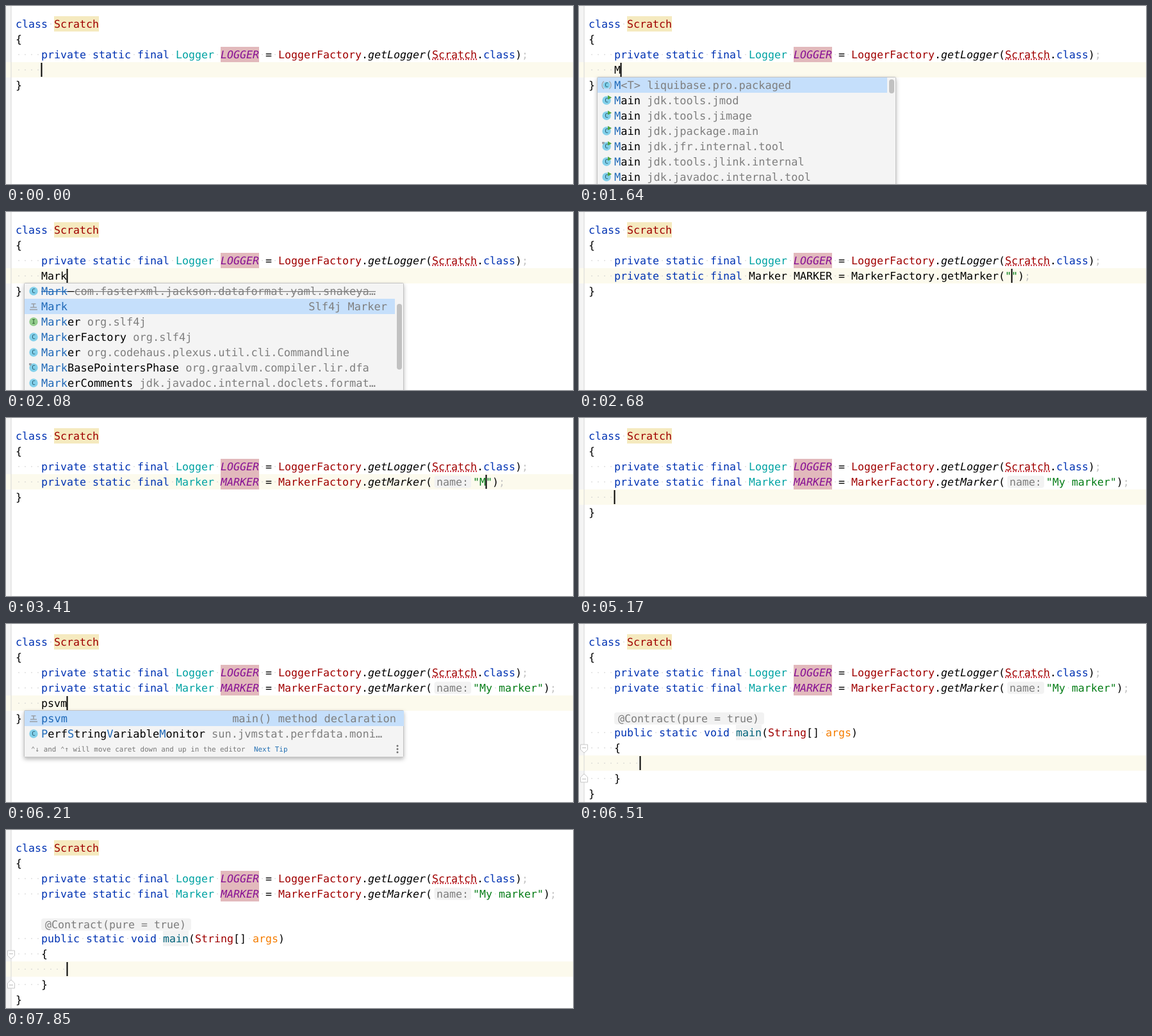
An HTML page for the animation above (8000 ms loop, 885 px wide and 279 px high).

```html
<!DOCTYPE html>
<html lang="en">
<head>
<meta charset="utf-8">
<title>Logger and marker templates</title>
<style>
html, body { margin: 0; width: 100%; height: 100%; overflow: hidden; background: #fff; }
svg { display: block; }
text {
  font-family: "DejaVu Sans Mono", monospace;
  white-space: pre;
  text-rendering: geometricPrecision;
}
</style>
</head>
<body>
<svg id="stage" width="885" height="279" viewBox="0 0 885 279" xmlns="http://www.w3.org/2000/svg">
  <defs>
    <filter id="shadow" x="-10%" y="-20%" width="120%" height="150%">
      <feDropShadow dx="0" dy="3" stdDeviation="3" flood-color="#000" flood-opacity=".28"/>
    </filter>
  </defs>
  <g id="scene"></g>
</svg>
<script>
const LOOP = 8000;
const LEFT = 15, CELL = 10, CODE_SIZE = 16.61;
const LIST_SIZE = 17, LIST_CELL = 10.235;
const ROW_HEIGHT = 24;

// Markup: "k~word~" draws word in style k; everything else is plain.
const COLORS = {
  k: '#0033b3', r: '#a00000', s: '#a00000', u: '#a00000', t: '#00a3a3', p: '#871094',
  i: '#000', q: '#067d17', e: '#c4c4c4', f: '#00627a', o: '#f57d00', b: '#000',
  m: '#1f69b8', g: '#7f7f7f'
};
const BACKGROUNDS = { s: '#f5eabf', p: '#e2b9bc', f: '#f3f3f3', b: '#93d9d9' };
const ITALIC = 'pi';

const escapeText = s => s.replace(/&/g, '&amp;').replace(/</g, '&lt;');
const rect = (x, y, w, h, fill, extra = '') =>
  `<rect x="${x}" y="${y}" width="${w}" height="${h}" fill="${fill}" ${extra}/>`;
const label = (x, y, text, fill, size, extra = '') =>
  `<text x="${x}" y="${y}" fill="${fill}" font-size="${size}" ${extra}>${escapeText(text)}</text>`;
const path = (d, stroke, width = 1, fill = 'none') =>
  `<path d="${d}" stroke="${stroke}" stroke-width="${width}" fill="${fill}"/>`;

const tokens = markup => markup.split(/(\w~[^~]*~)/).filter(Boolean).map(part =>
  part[1] === '~' ? [part[0], part.slice(2, -1)] : ['', part]);

const lineY = n => 28 + ROW_HEIGHT * n - (n > 5 ? 2 : 0);

function hint(x, y, w, text, inset) {
  return rect(x, y - 9.5, w, 19, '#f2f2f2', 'rx="4"') +
    label(x + inset, y + 6, text, '#7d7d7d', CODE_SIZE);
}

function codeLine(markup, y) {
  let x = LEFT, out = '';
  for (const [style, text] of tokens(markup)) {
    if (style === 'h') {
      out += hint(x + 3.5, y, 57.5, text, 3.5);
      x += 64;
      continue;
    }
    const w = text.length * CELL;
    if (BACKGROUNDS[style]) out += rect(x, y - 12, w, ROW_HEIGHT, BACKGROUNDS[style]);
    [...text].forEach((c, n) => {
      if (c === ' ') out += rect(x + n * CELL + 4.3, y - .5, 1.4, 1.4, '#cfcfcf');
    });
    if (text.trim()) {
      out += label(x, y + 6, text, COLORS[style] || '#000', CODE_SIZE,
        style && ITALIC.includes(style) ? 'font-style="italic"' : '');
    }
    if (style === 'u') {
      out += `<path d="M${x} ${y + 7.5}h${w}" stroke="#c8202c" stroke-width="1.8" stroke-dasharray="2 2"/>`;
    }
    x += w;
  }
  return out;
}

// Icon kinds: c class, r runnable, f final runnable, a abstract, l locked class, i interface, t template
function icon(kind, y) {
  if (kind === 't') {
    return path(`M37 ${y + 5}h12M43 ${y - 4}v6M39.5 ${y - 4}h7M38 ${y + 1.5}h10`, '#9aa0a6', 1.6);
  }
  const isInterface = kind === 'i';
  let out = '';
  if (kind === 'a') out += path(`M39 ${y - 6}a7.5 7.5 0 0 0 0 12M47 ${y - 6}a7.5 7.5 0 0 1 0 12`, '#a4abb0', 1.4);
  out += `<circle cx="43" cy="${y}" r="${kind === 'a' ? 5.3 : 6.7}" fill="${isInterface ? '#93cd8d' : '#82d0ea'}"/>`;
  out += label(43, y + 3.3, isInterface ? 'I' : 'C', isInterface ? '#27562a' : '#24566a', 9.5, 'text-anchor="middle"');
  if (kind === 'r' || kind === 'f') out += path(`M45 ${y - 8}l6 3.4l-6 3.4z`, 'none', 0, '#4fa53f');
  if (kind === 'f' || kind === 'l') out += path(`M36 ${y - 7}l4 0l-1 4l-3-1z`, 'none', 0, '#9aa0a6');
  return out;
}

function listRow([kind, markup, right, struck], y, rightEdge) {
  let x = 55, out = icon(kind, y);
  for (const [style, text] of tokens(markup)) {
    const color = COLORS[style] || '#000', w = text.length * LIST_CELL;
    out += label(x, y + 6, text, color, LIST_SIZE);
    if (struck) out += rect(x, y, w, 1.2, color);
    x += w;
  }
  if (right) out += label(rightEdge, y + 6, right, COLORS.g, LIST_SIZE, 'text-anchor="end"');
  return out;
}

function popup({ top, width, height, rows, selected, thumb, footer }) {
  const x = 28, inner = width - (thumb ? 14 : 0);
  let out = rect(x + .5, top + .5, width - 1, height - 1, '#f4f4f4', 'stroke="#c3c3c3" filter="url(#shadow)" rx="1"');
  out += rect(x + 1, top + 1 + selected * ROW_HEIGHT, inner - 1, ROW_HEIGHT, '#c5dffb');
  rows.forEach((row, n) => { out += listRow(row, top + 13 + n * ROW_HEIGHT, x + inner - 12); });
  if (thumb) out += rect(x + width - 11, thumb[0], 8, thumb[1], '#c1c1c1', 'rx="4"');
  if (footer) {
    const y = top + 65;
    out += label(39, y, '⌃↓ and ⌃↑ will move caret down and up in the editor', '#777', 10.9);
    out += label(387, y, 'Next Tip', '#2470b3', 10.9);
    for (const dy of [-9, -4, 1]) out += `<circle cx="611" cy="${y + dy}" r="1.5" fill="#6e6e6e"/>`;
  }
  return out;
}

const mainRows = prefix => {
  const row = (kind, pkg) => [kind, `m~${prefix}~${'Main'.slice(prefix.length)} g~${pkg}~`];
  return [
    row('r', 'jdk.tools.jmod'), row('r', 'jdk.tools.jimage'), row('r', 'jdk.jpackage.main'),
    row('f', 'jdk.jfr.internal.tool'), row('r', 'jdk.tools.jlink.internal'), row('r', 'jdk.javadoc.internal.tool')
  ];
};

const markRows = prefix => {
  const row = (kind, name, pkg, struck) =>
    [kind, `m~${prefix}~${name.slice(prefix.length)} g~${pkg}~`, '', struck];
  return [
    row('c', 'Mark', 'com.fasterxml.jackson.dataformat.yaml.snakeya…', true),
    ['t', `m~${prefix}~${'Mark'.slice(prefix.length)}`, 'Slf4j Marker'],
    row('i', 'Marker', 'org.slf4j'),
    row('c', 'MarkerFactory', 'org.slf4j'),
    row('c', 'Marker', 'org.codehaus.plexus.util.cli.Commandline'),
    row('l', 'MarkBasePointersPhase', 'org.graalvm.compiler.lir.dfa'),
    row('c', 'MarkerComments', 'jdk.javadoc.internal.doclets.format…')
  ];
};

const firstRow = ['a', 'm~M~g~<T> liquibase.pro.packaged~'];
const tall = { top: 111, height: 200 };
const classPopup = { ...tall, width: 467, selected: 0, thumb: [115, 22], rows: [firstRow, ...mainRows('M')] };
const mainPopup = { ...tall, width: 467, selected: 0, thumb: [115, 40], rows: mainRows('Ma') };
const markPopup = prefix => ({ ...tall, width: 593, selected: 1, thumb: [144, 103], rows: markRows(prefix) });
const psvmPopup = {
  top: 135, width: 593, height: 74, selected: 0, footer: true,
  rows: [
    ['t', 'm~psvm~', 'main() method declaration'],
    ['c', 'm~P~erfm~S~tringm~V~ariablem~M~onitor g~sun.jvmstat.perfdata.moni…~']
  ]
};

const head = [
  'k~class~ s~Scratch~', '{',
  '    k~private~ k~static~ k~final~ t~Logger~ p~LOGGER~ = r~LoggerFactory~.i~getLogger~(u~Scratch~.k~class~)e~;~'
];
const markerLine = (text, open = '(', close = ')') =>
  `    k~private~ k~static~ k~final~ t~Marker~ p~MARKER~ = r~MarkerFactory~.i~getMarker~${open}h~name:~q~"${text}"~${close}e~;~`;
const NAME = 'My marker';
const rawMarkerLine = '    k~private~ k~static~ k~final~ Marker MARKER = MarkerFactory.getMarker(q~""~)e~;~';

const column = n => LEFT + n * CELL;
const typing = (word, list) =>
  ({ lines: [...head, '    ' + word, '}'], row: 3, caret: column(4 + word.length), list });
const naming = n =>
  ({ lines: [...head, markerLine(NAME.slice(0, n)), '}'], row: 3, caret: 739 + n * CELL });
const below = (word, list) =>
  ({ lines: [...head, markerLine(NAME), '    ' + word, '}'], row: 4, caret: column(4 + word.length), list });
const hidden = state => ({ ...state, caret: null });
const matched = {
  lines: [...head, markerLine(NAME, 'b~(~', 'b~)~'), '}'], row: 3, caret: 839
};
const method = {
  lines: [...head, markerLine(NAME), '', '',
    '    k~public~ k~static~ k~void~ f~main~(r~String~[] o~args~)',
    '    {', '        ', '    }', '}'],
  row: 8, caret: column(8), method: true
};

const timeline = [
  [0, typing('')],
  [900, hidden(typing(''))],
  [1490, typing('M')],
  [1640, typing('M', classPopup)],
  [1790, typing('Ma', mainPopup)],
  [1940, typing('Mar', markPopup('Mar'))],
  [2080, typing('Mark', markPopup('Mark'))],
  [2680, { lines: [...head, rawMarkerLine, '}'], row: 3, caret: column(66) }],
  [2820, naming(0)],
  [3260, hidden(naming(0))],
  ...[1, 2, 3, 5, 6, 8, 9].map((n, i) => [Math.round((3410 + i * 880 / 6) / 10) * 10, naming(n)]),
  [4580, matched],
  [4880, { ...naming(9), caret: 859 }],
  [5020, below('')],
  [5770, below('p')],
  [5920, below('ps')],
  [6060, below('psv')],
  [6210, below('psvm', psvmPopup)],
  [6510, method],
  [7250, hidden(method)],
  [7850, method]
];

function methodExtras() {
  const fold = (y, dir) =>
    path(`M2.5 ${y - 6 * dir}h11v${8 * dir}l-5.5 ${5 * dir}l-5.5 ${-5 * dir}z`, '#c6c6c6', 1, '#fff') +
    path(`M5 ${y - dir}h6`, '#b5b5b5');
  return hint(55, 148, 234, '@Contract(pure = true)', 6) + fold(195, 1) + fold(242, -1);
}

function draw(state) {
  const y = lineY(state.row);
  return rect(0, 0, 885, 279, '#fff') +
    rect(0, 0, 8, 279, '#f4f4f4') +
    rect(0, y - 12, 885, ROW_HEIGHT, '#fcfaed') +
    rect(7.5, 0, 1, 279, '#d6d6d6') +
    state.lines.map((line, n) => codeLine(line, lineY(n))).join('') +
    (state.method ? methodExtras() : '') +
    (state.caret === null ? '' : rect(state.caret - .5, y - 11, 2, 22, '#000')) +
    (state.list ? popup(state.list) : '');
}

const scene = document.getElementById('scene');
const start = performance.now();
let shown;

function update(now) {
  const time = Math.max(0, now - start) % LOOP;
  const state = timeline.findLast(([from]) => from <= time)[1];
  if (state !== shown) {
    scene.innerHTML = draw(state);
    shown = state;
  }
  requestAnimationFrame(update);
}
update(start);
</script>
</body>
</html>
```
